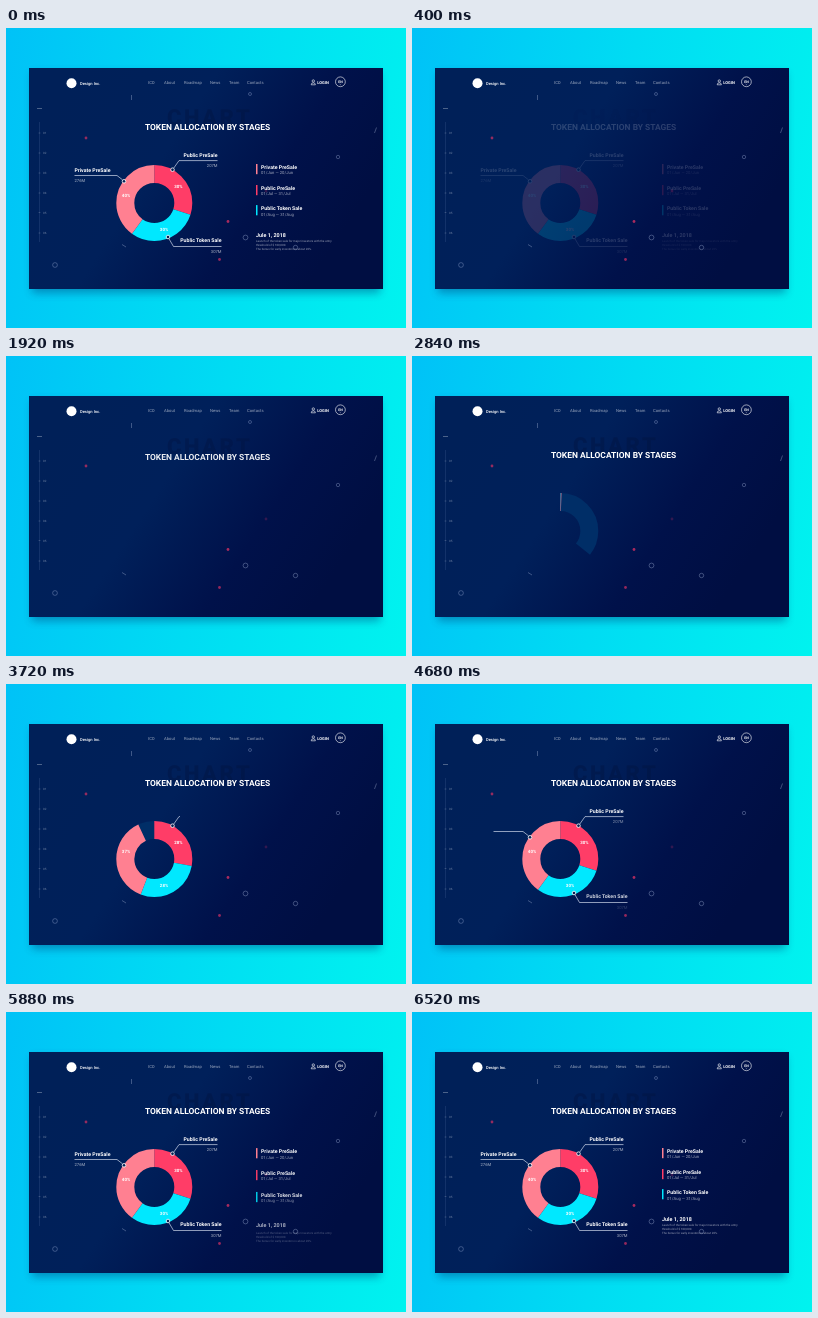
An HTML page that plays this animation: 400x300 px, repeating every 7680 ms.

```html
<!DOCTYPE html>
<html lang="en">
<head>
<meta charset="utf-8">
<title>Token allocation</title>
<style>
html, body { margin: 0; width: 100%; height: 100%; overflow: hidden; }
body { background: linear-gradient(100deg, #00c2f7, #00dcf3 50%, #00f3ef); }
svg { display: block; width: 100vw; height: 100vh; }
text { font-family: Roboto, Arial, sans-serif; fill: #fff; text-rendering: geometricPrecision; }
.bold { font-weight: 700; }
</style>
</head>
<body>
<svg id="stage" viewBox="0 0 400 300">
  <defs>
    <linearGradient id="panel" gradientUnits="userSpaceOnUse" x1="60" y1="60" x2="320" y2="230">
      <stop offset="0" stop-color="#002058"/>
      <stop offset=".38" stop-color="#00205a"/>
      <stop offset=".72" stop-color="#00114a"/>
      <stop offset="1" stop-color="#000e42"/>
    </linearGradient>
    <filter id="blur" x="-20%" y="-20%" width="140%" height="140%"><feGaussianBlur stdDeviation="4"/></filter>
  </defs>
  <rect x="26" y="45" width="348" height="220" fill="#003c78" opacity=".45" filter="url(#blur)"/>
  <rect x="23" y="40" width="354" height="221" fill="url(#panel)"/>
</svg>
<script>
const LOOP = 7680, STEP = 40, FADE = 480;
const RED = '#ff3d67', CYAN = '#00e8ff', PINK = '#ff8091';
const stage = document.getElementById('stage');

function add(tag, attrs, parent = stage, text) {
  const node = document.createElementNS('http://www.w3.org/2000/svg', tag);
  for (const key in attrs) node.setAttribute(key, attrs[key]);
  if (text) node.textContent = text;
  return parent.appendChild(node);
}
const write = (text, x, y, size, attrs, parent) =>
  add('text', { x, y, 'font-size': size, ...attrs }, parent, text);
const stroke = (d, color, width, attrs, parent) =>
  add('path', { d, fill: 'none', stroke: color, 'stroke-width': width, ...attrs }, parent);
const ring = (cx, cy, r, color, width, parent) =>
  add('circle', { cx, cy, r, fill: 'none', stroke: color, 'stroke-width': width }, parent);

const phase = (t, from, to) => Math.min(1, Math.max(0, (t - from) / (to - from)));
const easeOut = p => Math.sin(p * Math.PI / 2);
const easeBoth = p => (1 - Math.cos(p * Math.PI)) / 2;

// Header
add('circle', { cx: 65.5, cy: 55.2, r: 5, fill: '#fff' });
write('Design Inc.', 74, 56.6, 4.1, { 'font-weight': 500 });
[['ICO', 142], ['About', 158], ['Roadmap', 178], ['News', 204], ['Team', 223], ['Contacts', 241]]
  .forEach(([label, x]) => write(label, x, 55.8, 4.15, { opacity: .6 }));
ring(307.3, 53, 1.2, '#fff', .6);
stroke('M305.2 56.8q0-2 2.1-2t2.1 2z', '#fff', .6);
write('LOGIN', 311.3, 56, 4, { class: 'bold' });
ring(334.4, 53.8, 4.9, '#fff', .6);
write('EN', 334.4, 54.7, 3.5, { class: 'bold', 'text-anchor': 'middle' });
stroke('M333.6 56l.8.7.8-.7', '#fff', .4);

// Side scale
stroke('M31 80.5h5', '#fff', .6, { opacity: .5 });
stroke('M33.5 94V214', '#7f9bd0', .5, { opacity: .3 });
[105, 125, 145, 165, 184.5, 205].forEach((y, i) => {
  write('0' + (i + 1), 37, y + 1.1, 3, { opacity: .45 });
  stroke(`M32.6 ${y}h1.8`, '#fff', .5, { opacity: .35 });
});

// Floating bits
[[244, 66, 1.5, .5], [332, 129, 1.7, .5], [239.5, 209.5, 2.4, .55], [289.5, 219.5, 2.2, .55], [49, 237, 2.4, .5]]
  .forEach(([x, y, r, a]) => ring(x, y, r, `rgba(190,205,240,${a})`, .6));
[[80, 110, .75], [222, 193.5, .85], [213.5, 231.5, .75], [260, 163, .25]]
  .forEach(([x, y, a]) => add('circle', { cx: x, cy: y, r: 1.4, fill: '#c72f62', opacity: a }));
stroke('M125.5 67v5M370.5 99.5l-2 5.5M116 216.500l4 2.500', '#c3cde8', .6, { opacity: .55 });

// Animated layers
const scene = add('g', {});
const risers = [];
function riser(from, to, shift) {
  const node = add('g', {}, scene);
  risers.push({ node, from, to, shift });
  return node;
}
const fades = [];
function fade(node, from, to, max) { fades.push({ node, from, to, max }); }

write('CHART', 161, 97, 22, { 'font-weight': 900, 'letter-spacing': 2.5, style: 'fill:#001440', opacity: .42 },
  riser(1000, 2200, 16));
write('TOKEN ALLOCATION BY STAGES', 201.6, 102, 8.45, { class: 'bold', 'text-anchor': 'middle' },
  riser(600, 2400, 22));

// Pie
const pie = add('g', { transform: 'rotate(-90 148.3 175)' }, scene);
const arc = color => add('circle', {
  cx: 148.3, cy: 175, r: 29, fill: 'none', stroke: color, 'stroke-width': 18, pathLength: 100
}, pie);
function setArc(node, from, size) {
  node.setAttribute('visibility', size > 0 ? 'visible' : 'hidden');
  node.setAttribute('stroke-dasharray', `${size} ${100 - size}`);
  node.setAttribute('stroke-dashoffset', -from);
}
const ghost = arc('#002e67');
const slices = [[RED, 30, 172.3, 159.8], [CYAN, 30, 158, 203.4], [PINK, 40, 120, 169.4]].map(([color, share, x, y]) => ({
  share, node: arc(color),
  label: write('', x, y, 4.4, { class: 'bold', 'text-anchor': 'middle' }, scene)
}));

// Callouts: marker, path, start, label start, label, amount
const callouts = [
  { x: 166.5, y: 141.7, d: 'M167.8 140L173 132.600H211.500', start: 3560, text: 4000,
    name: 'Public PreSale', sum: '207M', tx: 211.5, ny: 129.4, sy: 139.4, anchor: 'end' },
  { x: 162, y: 209, d: 'M163 210.800L167.500 218.500H215.500', start: 3840, text: 4280,
    name: 'Public Token Sale', sum: '307M', tx: 215.5, ny: 214.2, sy: 225.3, anchor: 'end' },
  { x: 118, y: 153.3, d: 'M116.500 151.800L111 147.500H68.500', start: 4120, text: 4680,
    name: 'Private PreSale', sum: '276M', tx: 68.5, ny: 144.2, sy: 154.4, anchor: 'start' }
];
for (const c of callouts) {
  c.line = stroke(c.d, '#dfe6f6', .65, { pathLength: 1 }, scene);
  c.dot = add('circle', { cx: c.x, cy: c.y, r: 1.8, fill: '#0b2355', stroke: '#fff', 'stroke-width': .8 }, scene);
  fade(write(c.name, c.tx, c.ny, 5.2, { class: 'bold', 'text-anchor': c.anchor }, scene), c.text, c.text + 500, 1);
  fade(write(c.sum, c.tx, c.sy, 4.2, { 'text-anchor': c.anchor }, scene), c.text + 240, c.text + 800, .65);
}

// Legend
[
  ['Private PreSale', '01/Jun — 20/Jun', PINK, 140.6, 5040],
  ['Public PreSale', '01/Jul — 31/Jul', RED, 161.6, 5160],
  ['Public Token Sale', '01/Aug — 31/Aug', CYAN, 181.7, 5290]
].forEach(([name, dates, color, y, start]) => {
  const row = riser(start, start + 900, 20);
  add('rect', { x: 250, y: y - 4.6, width: 1.5, height: 10.2, fill: color }, row);
  write(name, 255, y, 5.2, { class: 'bold' }, row);
  write(dates, 255, y + 5.8, 4.2, { opacity: .62 }, row);
});
write('Jule 1, 2018', 250, 208.5, 5.4, { class: 'bold' }, riser(5470, 6370, 20));
const note = riser(5540, 6500, 18);
['Launch of the token sale for major investors with the entry', 'threshold of $ 100,000.',
  'The bonus for early investors is about 20%.']
  .forEach((line, i) => write(line, 250, 213.6 + i * 4.1, 2.95, { opacity: .62 }, note));

function render(time) {
  const leaving = time < FADE;
  const t = leaving ? LOOP : time;
  scene.setAttribute('opacity', leaving ? 1 - time / FADE : 1);

  for (const r of risers) {
    const p = easeOut(phase(t, r.from, r.to));
    r.node.setAttribute('opacity', p);
    r.node.setAttribute('transform', `translate(0 ${(1 - p) * r.shift})`);
  }
  for (const f of fades) f.node.setAttribute('opacity', f.max * phase(t, f.from, f.to));

  const grown = easeBoth(phase(t, 2790, 3910));
  setArc(ghost, 0, grown < 1 ? 100 * easeOut(phase(t, 2640, 3500)) : 0);
  let from = 0;
  for (const s of slices) {
    const size = s.share * grown;
    setArc(s.node, from, size);
    from += size;
    s.label.textContent = Math.round(size) + '%';
    s.label.setAttribute('opacity', phase(grown, .5, .85));
  }

  for (const c of callouts) {
    const drawn = phase(t, c.start, c.start + 760);
    c.line.setAttribute('visibility', drawn > 0 ? 'visible' : 'hidden');
    c.line.setAttribute('stroke-dasharray', `${drawn} 2`);
    c.dot.setAttribute('opacity', phase(t, c.start - 40, c.start + 80));
  }
}

function tick() {
  render(Math.floor(performance.now() % LOOP / STEP) * STEP);
  requestAnimationFrame(tick);
}
tick();
</script>
</body>
</html>
```
